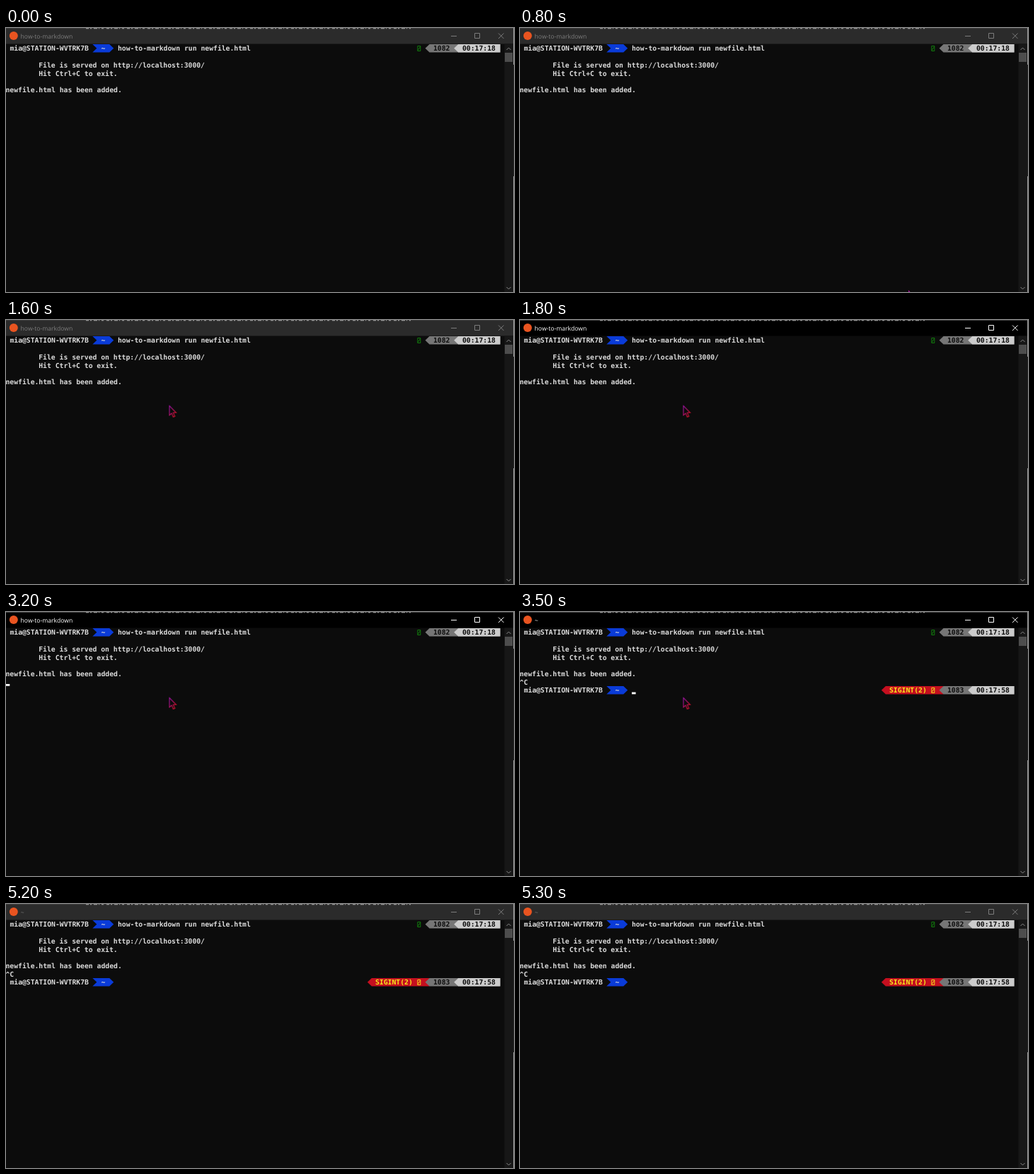
Recreate the animation shown at these times as an HTML page. Size 718x374 px, loop 5.4 s.

```html
<!DOCTYPE html>
<html lang="en">
<head>
<meta charset="utf-8">
<title>Terminal</title>
<style>
  html, body { margin: 0; width: 100%; height: 100%; overflow: hidden; background: #0c0c0c; }
  svg { display: block; width: 718px; height: 374px; }
  text { text-rendering: geometricPrecision; }

  .term { font: bold 9.75px "DejaVu Sans Mono", monospace; fill: #dcdcdc; }
  .term .user { fill: #c19c00; }
  .term .dark { fill: #0c0c0c; }
  .term .alert { fill: #f7ea1c; }
  .line { fill: none; stroke: currentColor; }

  /* Every change is a hard cut on a 100 ms grid. */
  .bar, .back, .busy, .idle, .caret, .caret2, .echo, .prompt, .pointer {
    animation: 5.4s step-end infinite;
  }
  .bar { color: #7c7c7c; animation-name: focus-ink; }
  .bar text { font: 8.6px "Open Sans", sans-serif; fill: currentColor; }
  .back { fill: #2b2b2b; animation-name: focus-back; }
  .busy { animation-name: busy; }
  .idle { animation-name: idle; }
  .caret { animation-name: caret; }
  .caret2 { animation-name: caret2; }
  .echo { animation-name: echo; }
  .prompt { animation-name: prompt; }
  .pointer { animation-name: pointer; }

  @keyframes focus-ink { 33.33% { color: #fff; } 96.29%, 100% { color: #7c7c7c; } }
  @keyframes focus-back { 33.33% { fill: #000; } 96.29%, 100% { fill: #2b2b2b; } }
  @keyframes busy { 0% { opacity: 1; } 64.81%, 100% { opacity: 0; } }
  @keyframes idle { 0% { opacity: 0; } 64.81%, 100% { opacity: 1; } }
  @keyframes caret { 0% { opacity: 0; } 37.03% { opacity: 1; } 61.11%, 100% { opacity: 0; } }
  @keyframes caret2 { 0% { opacity: 0; } 62.96% { opacity: 1; } 96.29%, 100% { opacity: 0; } }
  @keyframes echo { 0% { opacity: 0; } 61.11%, 100% { opacity: 1; } }
  @keyframes prompt { 0% { opacity: 0; } 62.96%, 100% { opacity: 1; } }
  @keyframes pointer {
    0% { transform: translate(549px, 400px); }
    14.81% { transform: translate(549px, 372px); }
    16.66% { transform: translate(470px, 318px); }
    18.51% { transform: translate(390px, 255px); }
    20.37% { transform: translate(318px, 196px); }
    22.22% { transform: translate(268px, 152px); }
    24.07% { transform: translate(240px, 128px); }
    25.92% { transform: translate(230.5px, 121px); }
    83.33% { transform: translate(278.5px, 169.5px); }
    85.18% { transform: translate(300px, 236px); }
    87.03% { transform: translate(329px, 350px); }
    88.88%, 100% { transform: translate(329px, 400px); }
  }
</style>
</head>
<body>
<svg viewBox="0 0 718 374">
  <defs>
    <linearGradient id="ink" x1="0" y1="0" x2="1" y2="1">
      <stop offset="0.15" stop-color="#a3149e"/>
      <stop offset="0.75" stop-color="#d01234"/>
    </linearGradient>
    <!-- Parts of a prompt row that are the same on each row -->
    <g id="row">
      <text class="user" x="5.4" y="32.3">mia@STATION-WVTRK7B</text>
      <path d="M122.3 23H146.2L152.2 28.75L146.2 34.5H122.3L128.3 28.75Z" fill="#0a3bd8"/>
      <text class="dark" x="134.5" y="32.3">~</text>
      <path d="M592.5 28.75L598.5 23H698.5V34.5H598.5Z" fill="#767676"/>
      <path d="M633.2 28.75L639.2 23H698.5V34.5H639.2Z" fill="#ccc"/>
    </g>
    <!-- Missing-glyph box -->
    <path id="tofu" class="line" d="M581.8 25.5H585.8V32.5H581.8ZM582.3 31.5L585.3 26.5" stroke-width="0.9"/>
  </defs>

  <rect width="718" height="374" fill="#0c0c0c"/>

  <!-- Title bar -->
  <rect class="back" width="718" height="22.5"/>
  <rect width="718" height="1" fill="#3c3c3c"/>
  <path d="M113 .6H572" stroke="#999" stroke-width="1.2" stroke-dasharray="4 2 2 3 5 2 1 3 3 4"/>
  <circle cx="10.8" cy="11" r="6" fill="#e95420"/>
  <g class="bar">
    <text class="busy" x="20.6" y="14.8">how-to-markdown</text>
    <text class="idle" x="20.8" y="14.8">~</text>
    <path class="line" d="M629 11.5H637M662.5 7.5H669.5V14.5H662.5ZM696 7.5L703.5 15M703.5 7.5L696 15"/>
  </g>

  <!-- Scroll bar and window edge -->
  <rect x="704.5" y="22.5" width="12.5" height="351.5" fill="#171717"/>
  <rect x="705" y="35" width="11" height="13" fill="#4d4d4d"/>
  <path class="line" color="#8a8a8a" d="M707.5 31L710.5 28L713.5 31M707.5 367L710.5 370L713.5 367"/>
  <rect x="717" width="1" height="374" fill="#9a9a9a"/>
  <rect x="717" y="52" width="1" height="158" fill="#222"/>

  <g class="term">
    <use href="#row"/>
    <text x="158" y="32.3">how-to-markdown run newfile.html</text>
    <use href="#tofu" color="#13870e"/>
    <text class="dark" x="604" y="32.3">1082</text>
    <text class="dark" x="645" y="32.3">00:17:18</text>

    <text x="46.2" y="55.8">File is served on http://localhost:3000/</text>
    <text x="46.2" y="67.5">Hit Ctrl+C to exit.</text>
    <text x="-0.6" y="91">newfile.html has been added.</text>
    <rect class="caret" y="102" width="5.3" height="2.8" fill="#fff"/>
    <text class="echo" x="-0.6" y="102.8">^C</text>

    <g class="prompt">
      <g transform="translate(0 82)">
        <path d="M510.8 28.75L516.8 23H598.5V34.5H516.8Z" fill="#c50f1f"/>
        <use href="#row"/>
        <text class="alert" x="522" y="32.3">SIGINT(2)</text>
        <use href="#tofu" color="#f7ea1c"/>
        <text class="dark" x="604" y="32.3">1083</text>
        <text class="dark" x="645" y="32.3">00:17:58</text>
      </g>
    </g>
    <rect class="caret2" x="158" y="113.6" width="5.6" height="2.8" fill="#fff"/>
  </g>

  <path class="pointer" d="M.5 .5V14L3.6 11.2L6 16.4L8.2 15.4L5.9 10.3H10Z"
        fill="#0c0c0c" stroke="url(#ink)" stroke-width="1.1"/>
</svg>
</body>
</html>
```
